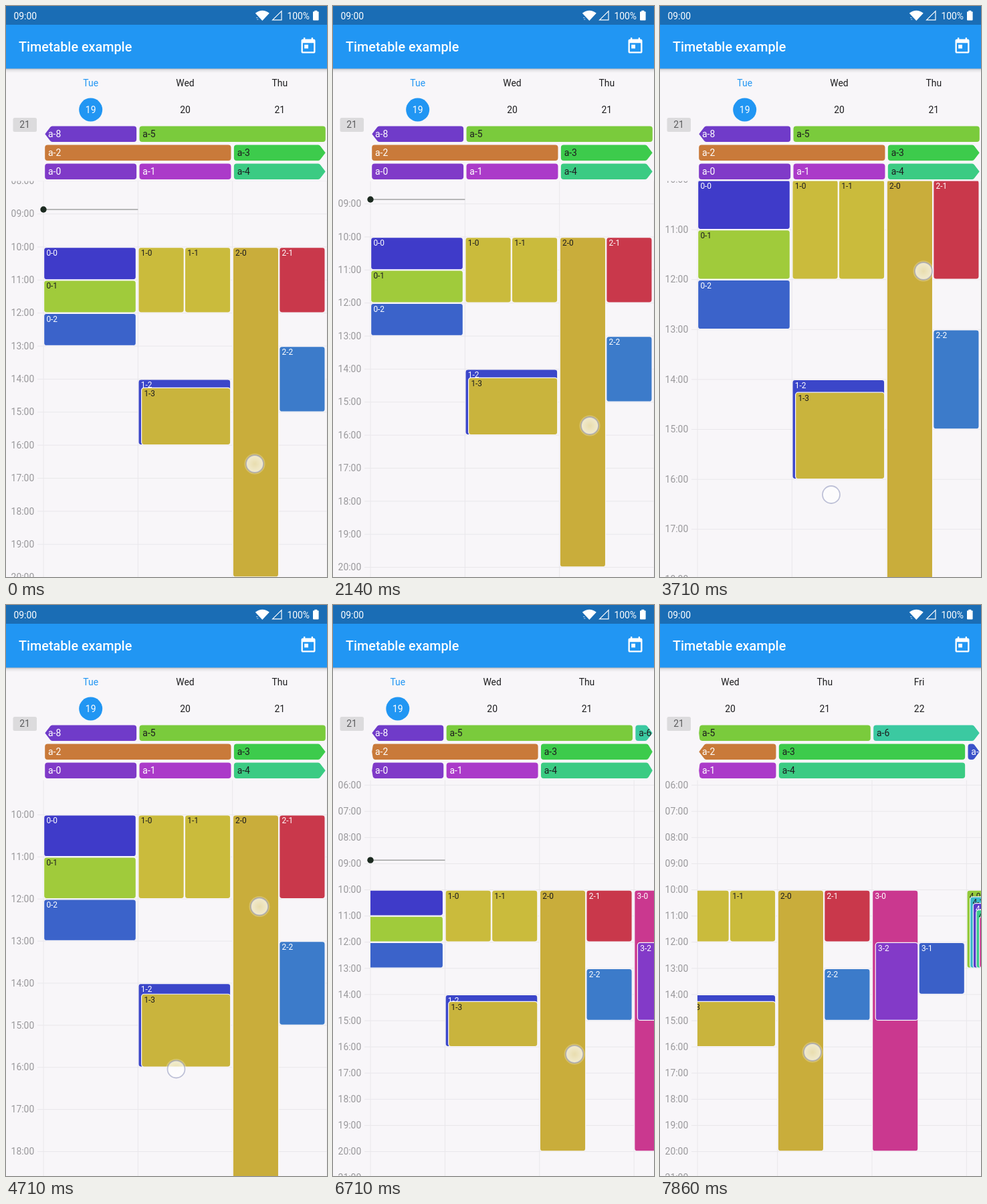
These frames come from a looping animation (480 by 853 pixels, 8000 ms). An HTML page with a canvas:

```html
<!DOCTYPE html>
<html lang="en">
<head>
<meta charset="utf-8">
<title>Timetable example</title>
<style>
html, body { margin: 0; width: 100%; height: 100%; overflow: hidden; background: #f8f6f9; }
canvas { display: block; width: 480px; height: 853px; }
</style>
</head>
<body>
<canvas id="stage"></canvas>
<script>
const W = 480, H = 853, LEFT = 56, TOP = 261.5, COL = (W - LEFT) / 3;
const BG = '#f8f6f9', BLUE = '#2196f3', GRID = '#e9e7eb', DARK = '#1d1d1f';
const LOOP = 8000, FPS = 7, NOW = 8.865;
const DAYS = ['Tue', 'Wed', 'Thu', 'Fri', 'Sat'];

// label, first day, end day, row, fill, light text
const ALL_DAY = [
  ['a-8', -3, 1, 0, '#703bc9', 1], ['a-5', 1, 3, 0, '#7acb3c', 0],
  ['a-6', 3, 6, 0, '#3bc9a1', 0], ['a-2', 0, 2, 1, '#c97a3a', 1],
  ['a-3', 2, 4, 1, '#3dcb4c', 0], ['a-7', 4, 6, 1, '#3b52c9', 1],
  ['a-0', 0, 1, 2, '#803ac8', 1], ['a-1', 1, 2, 2, '#ab3ac9', 1],
  ['a-4', 2, 4, 2, '#3bcb83', 0]
];

// label, start hour, end hour, left half, right half, indent, fill, light text
const EVENTS = [
  ['0-0', 10, 11, 0, 2, 0, '#3f3bc9', 1], ['0-1', 11, 12, 0, 2, 0, '#a0cb3b', 0],
  ['0-2', 12, 13, 0, 2, 0, '#3b63ca', 1], ['1-0', 10, 12, 0, 1, 0, '#cabb3c', 0],
  ['1-1', 10, 12, 1, 2, 0, '#cabb3c', 0], ['1-2', 14, 16, 0, 2, 0, '#3b46c9', 1],
  ['1-3', 14.25, 16, 0, 2, 1, '#c9b43d', 0], ['2-0', 10, 20, 0, 1, 0, '#c9ad3b', 0],
  ['2-1', 10, 12, 1, 2, 0, '#c9384b', 1], ['2-2', 13, 15, 1, 2, 0, '#3c7bca', 1],
  ['3-0', 10, 20, 0, 1, 0, '#ca388f', 1], ['3-1', 12, 14, 1, 2, 0, '#3a60c8', 1],
  ['3-2', 12, 15, 0, 1, 1, '#833ac8', 1], ['4-0', 10, 13, 0, 2, 0, '#93c93b', 0],
  ['4-1', 10.25, 13, 0, 2, 1, '#3bb8ca', 0], ['4-2', 10.5, 13, 0, 2, 2, '#5a3ac9', 1],
  ['4-3', 10.75, 13, 0, 2, 3, '#3bc98f', 0], ['4-4', 11, 13, 0, 2, 4, '#c93a90', 1]
];

const TODAY_ICON = new Path2D('M19 3h-1V1h-2v2H8V1H6v2H5c-1.11 0-1.99.9-1.99 2L3 19c0 1.1.89 2 2 2h14c1.1 0 2-.9 2-2V5c0-1.1-.9-2-2-2zm0 16H5V8h14v11zM7 10h5v5H7z');
const WIFI = new Path2D('M372.8 10.8Q383.3 2.8 393.8 10.8L383.3 22Z');
const SIGNAL = new Path2D('M398.6 20.9H412V7.6Z');

const canvas = document.getElementById('stage');
const ctx = canvas.getContext('2d');
const dpr = window.devicePixelRatio || 1;
canvas.width = W * dpr;
canvas.height = H * dpr;

const clamp = (v, lo = 0, hi = 1) => Math.min(hi, Math.max(lo, v));
const mix = (a, b, p) => a + (b - a) * p;

// Eased value at step s through [step, value] keys.
function track(s, ...keys) {
  let i = 0;
  while (i < keys.length - 2 && s > keys[i + 1][0]) i++;
  const [s0, a] = keys[i], [s1, b] = keys[i + 1];
  const p = clamp((s - s0) / (s1 - s0));
  return mix(a, b, p * p * (3 - 2 * p));
}

// Scroll position, hour height and touches at step s.
function pose(s) {
  const p = { x: 0, h: 49.35, y10: 0, touches: [] };
  if (s < 18) {
    p.y10 = track(s, [3, 360], [9, 269], [9.5, 269], [13.5, 345]);
    p.touches.push([
      track(s, [1.3, 372], [9, 397], [9.5, 397], [13.5, 384]),
      track(s, [1.3, 684], [9, 543], [9.5, 543], [13.5, 627])
    ]);
  } else if (s < 27) {
    p.h = track(s, [18.5, 49.35], [26, 74.6]);
    p.y10 = 345 - (p.h - 49.35) * 3.386;
    p.touches.push(
      [track(s, [18, 386], [26, 394]), track(s, [18, 455], [26, 396])],
      [track(s, [18, 266], [26, 256]), track(s, [18, 652], [26, 730])]
    );
  } else {
    p.h = track(s, [28, 74.6], [41, 39.1]);
    p.y10 = p.h > 41.35 ? 259.5 + (74.6 - p.h) * 4.602 : 412.5 + (41.35 - p.h) * 5.78;
    if (s < 42) {
      p.touches.push(
        [track(s, [27, 394], [39, 364]), track(s, [27, 396], [39, 505])],
        [track(s, [27, 256], [39, 253]), track(s, [27, 730], [39, 657])]
      );
    } else if (s > 42) {
      const d = clamp((s - 44.5) / 10.5);
      const fx = 412 - 184 * (1 - (1 - d) ** 1.19);
      p.touches.push([fx, mix(672, 668, d)]);
      p.x = Math.min(0, fx - 391);
    }
  }
  return p;
}

function text(str, x, y, size, color, align = 'left', weight = 400) {
  ctx.font = `${weight} ${size}px Roboto, sans-serif`;
  ctx.textAlign = align;
  ctx.fillStyle = color;
  ctx.fillText(str, x, y);
}

function rect(x, y, w, h, color) {
  ctx.fillStyle = color;
  ctx.fillRect(x, y, w, h);
}

function rounded(x, y, w, h, r) {
  ctx.beginPath();
  ctx.roundRect(x, y, w, h, r);
}

function disc(x, y, r, color) {
  ctx.beginPath();
  ctx.arc(x, y, r, 0, 7);
  ctx.fillStyle = color;
  ctx.fill();
}

function clipped(x, y, w, h, draw) {
  ctx.save();
  ctx.beginPath();
  ctx.rect(x, y, w, h);
  ctx.clip();
  draw();
  ctx.restore();
}

function drawBars() {
  const shade = ctx.createLinearGradient(0, 93, 0, 100);
  shade.addColorStop(0, 'rgba(0,0,0,.28)');
  shade.addColorStop(0.4, 'rgba(0,0,0,.08)');
  shade.addColorStop(1, 'rgba(0,0,0,0)');
  rect(0, 93, W, 7, shade);
  rect(0, 0, W, 93.5, BLUE);
  rect(0, 0, W, 28, '#1a6db5');
  text('09:00', 11.5, 19.5, 13.9, '#fff');
  text('100%', 454, 19.5, 13.9, '#fff', 'right');
  text('Timetable example', 19, 67.7, 19.8, '#fff', 'left', 500);

  ctx.fillStyle = '#fff';
  ctx.fill(WIFI);
  rect(374, 17, 2.5, 1, 'rgba(255,255,255,.6)');
  rect(375, 19.5, 2.5, 1, 'rgba(255,255,255,.6)');
  ctx.strokeStyle = '#fff';
  ctx.lineWidth = 1.2;
  ctx.stroke(SIGNAL);
  rect(461.3, 6.8, 4, 2, '#fff');
  ctx.fillStyle = '#fff';
  rounded(459, 8.2, 8.6, 13.2, 1);
  ctx.fill();

  ctx.save();
  ctx.translate(438, 46);
  ctx.scale(7 / 6, 7 / 6);
  ctx.fillStyle = '#fff';
  ctx.fill(TODAY_ICON);
  ctx.restore();
}

function drawHeader(colX) {
  ctx.fillStyle = '#dcdbdd';
  rounded(10.5, 167, 35.5, 21, 2.5);
  ctx.fill();
  text('21', 28, 182.3, 13.9, '#5c5c5e', 'center');
  clipped(LEFT, 95, W - LEFT, 90, () => DAYS.forEach((name, i) => {
    const x = colX(i) + COL / 2, today = i === 0;
    text(name, x, 120, 13.9, today ? BLUE : DARK, 'center');
    if (today) disc(x, 155, 17.5, BLUE);
    text(19 + i, x, 160, 13.9, today ? '#fff' : DARK, 'center');
  }));
}

// Rounded bar whose ends sharpen into arrows.
function arrowBar(l, r, t, b, al, ar) {
  const m = (t + b) / 2;
  const pts = [[r - ar, t, 4], [r, m, 1], [r - ar, b, 4], [l + al, b, 4], [l, m, 1], [l + al, t, 4]];
  ctx.beginPath();
  ctx.moveTo((l + al + r - ar) / 2, t);
  pts.forEach(([x, y, rad], i) => {
    const next = pts[(i + 1) % pts.length];
    ctx.arcTo(x, y, next[0], next[1], Math.min(rad, (r - l) / 3));
  });
  ctx.closePath();
}

function drawAllDay(colX) {
  for (const [label, from, to, row, fill, light] of ALL_DAY) {
    const x0 = colX(from), x1 = colX(to);
    const l = Math.max(LEFT, x0) + 2.2, r = Math.min(W, x1) - 2.2;
    if (r - l < 1) continue;
    const tip = Math.min(9, (r - l) / 2), t = 179.6 + row * 28;
    ctx.save();
    arrowBar(l, r, t, t + 23.3, tip * clamp((LEFT - x0) / COL), tip * clamp((x1 - W) / COL));
    ctx.fillStyle = fill;
    ctx.fill();
    ctx.clip();
    text(label, l + 4.8, t + 16.6, 13.9, light ? '#fff' : DARK);
    ctx.restore();
  }
}

function drawEvent([label, from, to, a, b, indent, fill, light], colX, hourY) {
  const inner = COL - 2.33;
  const col = colX(+label[0]);
  const x = col + inner * a / 2 + indent * 4.67, w = col + inner * b / 2 - x;
  const y = hourY(from), h = hourY(to) - y;
  if (x > W || x + w < LEFT) return;
  rounded(x + 0.6, y + 0.6, w - 1.2, h - 1.2, 4);
  ctx.fillStyle = fill;
  ctx.fill();
  ctx.strokeStyle = BG;
  ctx.lineWidth = 1.2;
  ctx.stroke();
  clipped(x + 1, y + 1, w - 2, h - 2, () =>
    text(label, x + 4.4, y + 13, 11.9, light ? '#fff' : DARK));
}

function drawGrid(colX, hourY) {
  clipped(0, TOP, W, H - TOP, () => {
    for (let hr = 1; hr < 24; hr++) {
      const y = hourY(hr);
      rect(47, y - 0.5, W - 47, 1, GRID);
      text(String(hr).padStart(2, '0') + ':00', 42.2, y + 4.7, 13.9, '#99989b', 'right');
    }
    rect(LEFT - 0.5, TOP, 1, H, GRID);
  });
  clipped(LEFT, TOP, W - LEFT, H - TOP, () => {
    for (let i = 1; i < 5; i++) rect(colX(i) - 0.5, TOP, 1, H, GRID);
    EVENTS.forEach(e => drawEvent(e, colX, hourY));
  });
  const end = colX(1), y = hourY(NOW);
  if (end > LEFT) clipped(0, TOP, W, H - TOP, () => {
    rect(LEFT, y - 0.5, end - LEFT, 1, '#777a78');
    disc(LEFT, y, 4.7, '#1c2a20');
  });
}

function drawTouch([x, y]) {
  disc(x, y, 15.5, 'rgba(255,255,255,.25)');
  const glow = ctx.createRadialGradient(x, y, 0, x, y, 13);
  glow.addColorStop(0, 'rgba(255,255,255,.45)');
  glow.addColorStop(1, 'rgba(255,255,255,.68)');
  disc(x, y, 13, glow);
  ctx.strokeStyle = 'rgba(140,146,186,.55)';
  ctx.lineWidth = 1.8;
  ctx.stroke();
}

function render(ms) {
  const step = Math.min(55, Math.floor((ms % LOOP + 5) * FPS / 1000));
  const p = pose(step);
  const colX = day => LEFT + p.x + day * COL;
  const hourY = hr => p.y10 + (hr - 10) * p.h;
  ctx.setTransform(dpr, 0, 0, dpr, 0, 0);
  rect(0, 0, W, H, BG);
  drawGrid(colX, hourY);
  drawHeader(colX);
  drawAllDay(colX);
  drawBars();
  p.touches.forEach(drawTouch);
}

const start = performance.now();
function tick() {
  render(performance.now() - start);
  requestAnimationFrame(tick);
}
tick();
</script>
</body>
</html>
```
